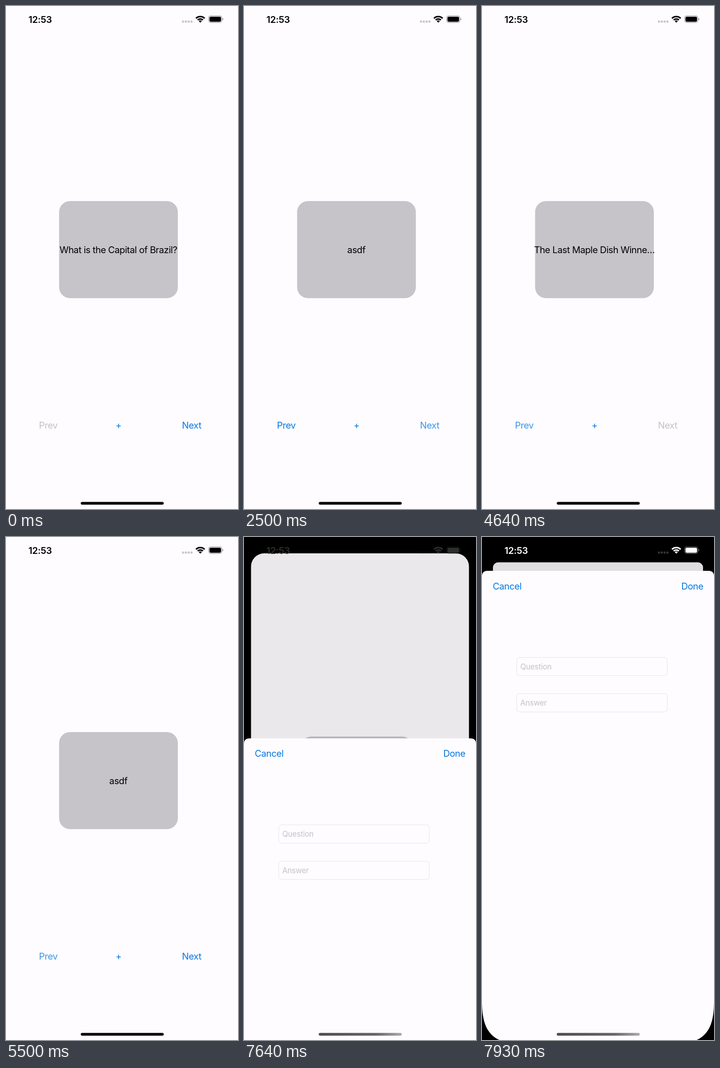
An HTML page for the animation above (8 s loop, 509 px wide and 1101 px high).

```html
<!DOCTYPE html>
<html lang="en">
<head>
<meta charset="utf-8">
<title>Flashcards</title>
<style>
  html, body { margin: 0; width: 100%; height: 100%; overflow: hidden; background: #000; }
  svg { display: block; width: 100%; height: 100%; }
  text { font: 20.2px Inter, Roboto, sans-serif; letter-spacing: -.51px; text-anchor: middle; }
  .link { fill: #067ae9; }
  .pressed { fill: #3b97ee; }
  .off { fill: #c3c2c6; }
  .sheet .link { fill: #0878de; }
  .sheet .hint { font-size: 16.65px; letter-spacing: -.22px; text-anchor: start; fill: #c4c2c6; }
  .field { fill: none; stroke: #e5e3e7; }
  .time { font-weight: 600; letter-spacing: -.3px; }
</style>
</head>
<body>
<svg viewBox="0 0 509 1101">
  <defs>
    <linearGradient id="bar">
      <stop offset="0" stop-color="#4c4b4d"/>
      <stop offset=".7" stop-color="#666567"/>
      <stop offset="1" stop-color="#aaa9ac"/>
    </linearGradient>
  </defs>
  <rect width="509" height="1101"/>

  <g id="deck">
    <rect id="page" width="509" height="1101" fill="#fefcff"/>
    <rect x="116.5" y="427" width="260.5" height="212.5" rx="24" fill="#c6c4c9"/>
    <text id="card" x="246.5" y="540.6"></text>
    <text id="prev" x="92.7" y="925">Prev</text>
    <text class="link" x="247" y="925">+</text>
    <text id="next" x="407.3" y="925">Next</text>
    <rect id="dim" width="509" height="1101"/>
  </g>

  <g id="sheet" class="sheet">
    <path id="panel" fill="#fefcff"/>
    <text class="link" x="55" y="40.8">Cancel</text>
    <text class="link" x="461.3" y="40.8">Done</text>
    <rect class="field" x="76.2" y="189.5" width="330.3" height="40" rx="6"/>
    <text class="hint" x="84" y="215.5">Question</text>
    <rect class="field" x="76.2" y="269" width="330.3" height="40" rx="6"/>
    <text class="hint" x="84" y="295.3">Answer</text>
  </g>

  <g id="status" fill="currentColor">
    <text class="time" x="75" y="36.5">12:53</text>
    <g id="dots">
      <rect x="386" y="31.8" width="4.6" height="4.6" rx="1.4"/>
      <rect x="392.2" y="31.8" width="4.6" height="4.6" rx="1.4"/>
      <rect x="398.4" y="31.8" width="4.6" height="4.6" rx="1.4"/>
      <rect x="404.6" y="31.8" width="4.6" height="4.6" rx="1.4"/>
    </g>
    <path d="M416.8 27A13.5 13.5 0 0 1 435.8 27M420.5 30.7A8.2 8.2 0 0 1 432.1 30.7"
          fill="none" stroke="currentColor" stroke-width="3.3"/>
    <path d="M426.3 36.4L422.9 33A4.8 4.8 0 0 1 429.7 33Z"/>
    <rect x="444.6" y="21.6" width="29" height="14.6" rx="4.4" fill="none"
          stroke="currentColor" stroke-width="1.2" opacity=".42"/>
    <rect x="446.4" y="23.4" width="25.4" height="11" rx="2.8"/>
    <path d="M475 26.5Q476.8 27.4 476.8 28.9T475 31.3Z" opacity=".45"/>
  </g>
  <rect id="home" x="164" y="1085.5" width="182" height="6" rx="3"/>
</svg>

<script>
const $ = id => document.getElementById(id);
const LOOP = 8000;
const cards = [
  'What is the Capital of Brazil?', 'asdfasd', 'asdfasfasd', 'asdf', 'asdfas',
  'as fast', 'The Last Maple Dish Winne…'
];

// [time, card index, pressed button]
const steps = [
  [0, 0], [500, 1], [930, 1, 'next'], [1070, 2], [1350, 2, 'next'], [1500, 3],
  [1780, 3, 'next'], [1930, 3], [2500, 3, 'next'], [2640, 4], [2930, 4, 'next'],
  [3210, 5], [3640, 5, 'next'], [3780, 6],
  [4640, 6, 'prev'], [4780, 5], [4930, 5, 'prev'], [5070, 4], [5210, 4, 'prev'], [5350, 3],
  [5500, 3, 'prev'], [5640, 2], [5930, 2, 'prev'], [6070, 1], [6350, 1, 'prev'], [6500, 0]
];

// [time, sheet progress, status bar brightness]
const rise = [[0, 0, 0], [7640, .643, 46], [7780, .94, 205], [7930, 1, 255]];

const at = (list, t) => list.findLast(step => step[0] <= t);

function button(id, enabled, pressed) {
  $(id).setAttribute('class', !enabled ? 'off' : pressed === id ? 'pressed' : 'link');
}

function drawSheet(p, light) {
  const open = p > 0, done = p === 1;
  const top = 1101 - 1027 * p, bottom = 1101 - top;
  $('deck').setAttribute('transform',
    `translate(254.5 ${55.5 * p}) scale(${1 - .0943 * p}) translate(-254.5 0)`);
  for (const id of ['page', 'dim']) $(id).setAttribute('rx', open ? 63 - 50 * p : 0);
  $('dim').setAttribute('opacity', .12 * p);

  $('sheet').setAttribute('visibility', open ? 'visible' : 'hidden');
  $('sheet').setAttribute('transform', `translate(0 ${top})`);
  const base = done
    ? `V${bottom - 84}C509 ${bottom - 40} 499 ${bottom - 13} 471 ${bottom}H38C10 ${bottom - 13} 0 ${bottom - 40} 0 ${bottom - 84}`
    : `V${bottom}H0`;
  $('panel').setAttribute('d', `M0 12Q0 0 12 0H497Q509 0 509 12${base}Z`);

  $('status').style.color = `rgb(${light},${light},${light})`;
  $('dots').setAttribute('fill', open ? '#333' : '#c8c6ca');
  $('dots').setAttribute('opacity', open ? light / 255 : 1);
  $('home').setAttribute('fill', open ? 'url(#bar)' : '#000');
}

const start = performance.now();
function draw() {
  const t = (performance.now() - start) % LOOP;
  const [, index, pressed] = at(steps, t);
  const [, progress, light] = at(rise, t);
  $('card').textContent = cards[index];
  button('prev', index > 0, pressed);
  button('next', index < cards.length - 1, pressed);
  drawSheet(progress, light);
  requestAnimationFrame(draw);
}
draw();
</script>
</body>
</html>
```
